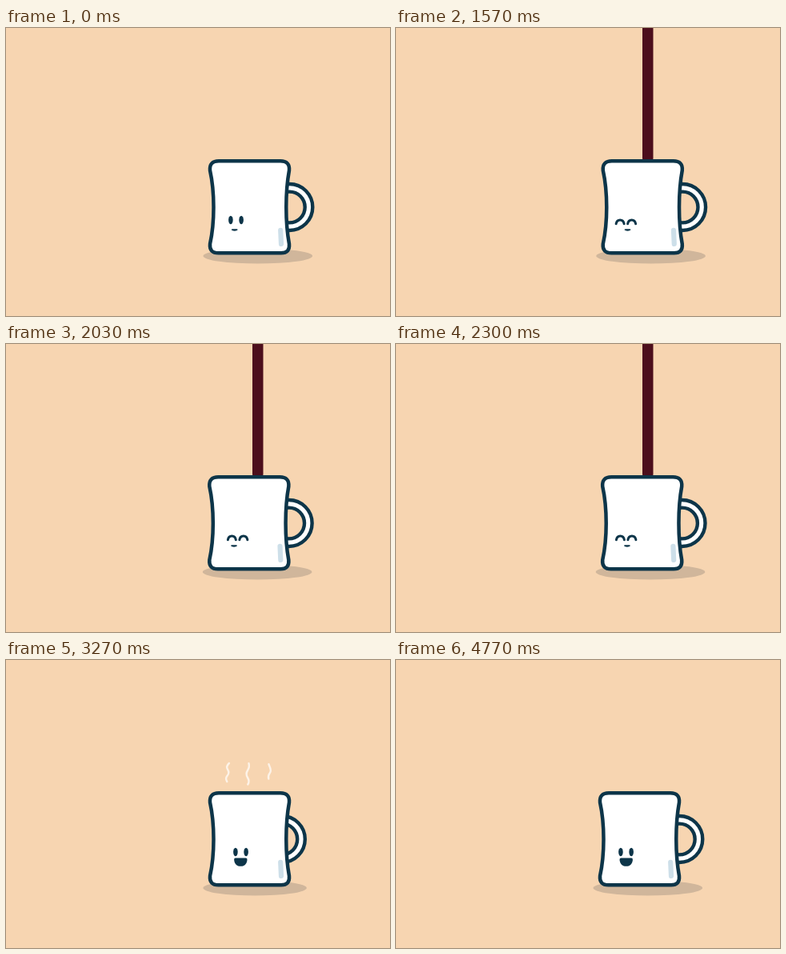
Animation of 480 by 360 pixels, one loop 4.81 s. Source, as an HTML page:

```html
<!DOCTYPE html>
<html lang="en">
<head>
<meta charset="utf-8">
<title>Coffee mug</title>
<style>
  html, body { margin: 0; width: 100%; height: 100%; overflow: hidden; background: #f7d5b1; }
  svg { display: block; width: 100vw; height: 100vh; }
  .line { fill: none; stroke: #0d3549; stroke-linecap: round; stroke-linejoin: round; }
  .ink { fill: #0d3549; }
  .steam { fill: none; stroke: #fdf3e8; stroke-width: 2.4; stroke-linecap: round; }
</style>
</head>
<body>
<svg viewBox="0 0 480 360">
  <ellipse id="shadow" cy="285" ry="9.5" fill="#d0b69b"/>
  <rect id="stream" x="308" width="13.5" rx="3" ry="2" fill="#4c0e1c"/>
  <g id="steams">
    <path class="steam" pathLength="1" d="M276.3 152q-2.6-4 .4-7.500t.4-7.500t1.800-8"/>
    <path class="steam" pathLength="1" d="M302.300 155.500q2.600-4-.3-8.500t0-9t1.400-9"/>
    <path class="steam" pathLength="1" d="M328.300 148.500q-1-4 1.400-7t-.4-9t.7-10"/>
  </g>
  <g id="mug">
    <g id="handle">
      <circle class="line" cx="354.300" cy="224" r="24.200" stroke-width="14"/>
      <circle cx="354.300" cy="224" r="24.200" fill="none" stroke="#fff" stroke-width="5.200"/>
    </g>
    <path class="line" stroke-width="4.500" style="fill:#fff" d="M266 166.300H343Q355 166.300 354 178C349 205 349 243 354 270Q355 281.300 344 281.300H265.500Q254 281.300 255 270C261 243 261 205 255 178Q254 166.300 266 166.300Z"/>
    <path d="M343.200 252.800L344 270" fill="none" stroke="#cddfe9" stroke-width="6.200" stroke-linecap="round"/>
    <path id="flat" class="ink" d="M281.700 252.300q0-1 1.500-1h5q1.500 0 1.500 1q-1 1.400-4 1.400t-4-1.400Z"/>
    <path id="smile" class="ink" d="M-6.500-4.800H6.500Q8.400-4.800 8.200-2.500C7.600 2.800 4.500 5.400 0 5.400S-7.600 2.800-8.200-2.500Q-8.400-4.800-6.500-4.800Z"/>
  </g>
  <g id="open" class="ink">
    <ellipse cx="-6.600" rx="2.800" ry="5.200"/>
    <ellipse cx="6.600" rx="2.800" ry="5.200"/>
  </g>
  <path id="closed" class="line" stroke-width="3" d="M-12 4.200C-11-2.200-3-2.200-2 4.200M2.500 4.200C3.500-2.200 11.500-2.200 12.500 4.200"/>
</svg>
<script>
const LOOP = 4810, FRAME = 100 / 3;
const $ = id => document.getElementById(id);
const set = (el, attrs) => { for (const k in attrs) el.setAttribute(k, attrs[k]); };
const show = (el, on) => el.style.display = on ? '' : 'none';
const move = (el, x, y = 0, sx = 1, sy = sx) =>
  el.setAttribute('transform', `translate(${x} ${y}) scale(${sx} ${sy})`);
const ramp = (t, a, b) => Math.min(1, Math.max(0, (t - a) / (b - a)));
const ease = p => p * p * (3 - 2 * p);
const glide = (t, a, b) => ease(ramp(t, a, b));

// Eye height: shuts and reopens within 200 ms.
const blink = (t, start) => 1 - 0.9 * Math.sin(Math.PI * ramp(t, start, start + 200));

// Start of drawing and of erasing, then the length of the erasure.
const steamTimes = [[2880, 3500, 400], [2970, 3620, 420], [3070, 3760, 440]];
const steams = [...$('steams').children];

function draw(t) {
  const pouring = t > 1212 && t < 2812;
  const shake = pouring ? 1.2 + 3.8 * Math.sin(2 * Math.PI * (t - 1212) / 145.8 - 0.32) : 0;
  const turn = glide(t, 2810, 3200) - glide(t, 4400, 4780);

  move($('mug'), shake);
  move($('handle'), -9.5 * turn);
  set($('shadow'), { cx: 314.8 + shake - 3.7 * turn, rx: 68.3 - 3.6 * turn });

  const top = 165 * ramp(t, 2330, 2588);
  const bottom = 165 * ramp(t, 1212, 1470);
  show($('stream'), bottom > top);
  set($('stream'), { y: top || -5, height: Math.max(0, bottom - (top || -5)) });

  const happy = glide(t, 2812, 3010);
  show($('flat'), !happy);
  show($('smile'), happy);
  move($('smile'), 285.7 + 2 * happy + 5.6 * turn, 252.4, 0.5 + 0.5 * happy, 0.2 + 0.8 * happy);

  show($('open'), !pouring);
  show($('closed'), pouring);
  move($('open'), 287.5 + 6 * turn, 240, 1, blink(t, 610) * blink(t, 4010));
  move($('closed'), 289 - shake / 2, 240.6);

  steams.forEach((el, i) => {
    const [start, leave, span] = steamTimes[i];
    const head = glide(t, start, start + 310), tail = glide(t, leave, leave + span);
    show(el, head > tail);
    set(el, { 'stroke-dasharray': `${head - tail} 2`, 'stroke-dashoffset': -tail });
  });
}

function tick() {
  const t = performance.now() % LOOP;
  draw(Math.floor((t + 4) / FRAME) * FRAME);
  requestAnimationFrame(tick);
}
tick();
</script>
</body>
</html>
```
